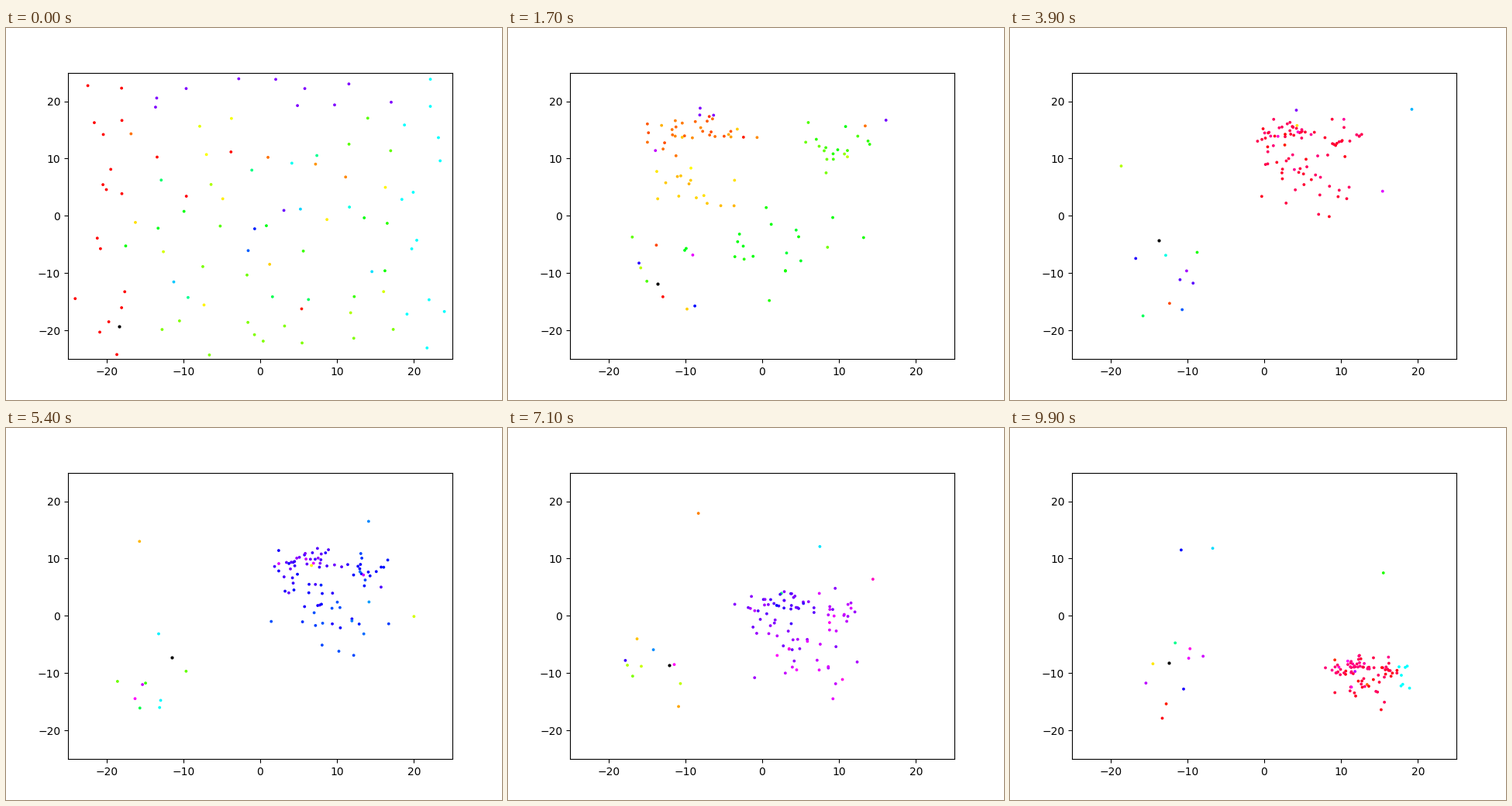
Recreate the animation shown at these times as a matplotlib script. Size 640 px wide and 480 px high, loop 10000 ms.

```python
import numpy as np
import matplotlib.pyplot as plt
from matplotlib.animation import FuncAnimation
from matplotlib.colors import hsv_to_rgb

FRAMES, SPEED, WALL = 100, 0.5, 17.5
rng = np.random.default_rng(8)
times = np.array([0, 17, 39, 54, 71, 82, 99])

# Flock at each time: core x, y, stretch x, y, heading, veer away from the core.
FLOCK = [(-8.5, 14.7, 2.5, 1.9, 25, 10),
         (3, 14.7, 1, 1, 345, 0),
         (6.4, 9.4, 1, 1, 257, -2.7),
         (2.4, 2, 1, 1, 265, 2.8),
         (5.6, -2.6, 0.9, 0.9, 290, 1),
         (12, -8.7, 0.6, 0.4, 331, 2)]

# Parts of the flock: size, offset from the core, spread.
PARTS = [(36, 0, 0, 1.9, 1.1), (18, 7, -1.2, 1.4, 1.6),
         (15, -0.2, -5, 2.6, 1.7), (19, 4.5, -11, 2.9, 2.6)]

STRAYS = [[(13.4, 15.7), (19.2, 18.6), (14.1, 16.5), (7.5, 12.1), (1.6, 13), (-6.7, 11.8)],
          [(-16.9, -3.7), (-18.6, 8.7), (-15.7, 13), (-8.3, 17.9), (-6.3, 18.8), (-10.8, 11.5)],
          [(16.1, 16.7), (15.4, 4.3), (20, -0.1), (14.4, 6.4), (17.4, 3), (15.5, 7.5)]]

HUNTER = np.array([(-18.3, -19.3), (-13.6, -11.9), (-13.7, -4.3), (-11.5, -7.2),
                   (-12.1, -8.6), (-11.5, -8.5), (-12.4, -8.2)])

size, off_x, off_y, sd_x, sd_y = np.repeat(PARTS, [p[0] for p in PARTS], axis=0).T
offset, spread = np.column_stack([off_x, off_y]), np.column_stack([sd_x, sd_y])
place = rng.normal(size=offset.shape)


def steer(pos, heading):
    """Velocity along the heading, or straight inward beyond a wall."""
    x, y = pos.T
    heading = np.select([x < -WALL, x > WALL, y < -WALL, y > WALL],
                        [0, 180, 90, 270], heading)
    a = np.radians(heading)
    return SPEED * np.column_stack([np.cos(a), np.sin(a)])


def start_pose(side=10):
    """Agents spread evenly over the whole field."""
    cells = np.stack(np.meshgrid(range(side), range(side)), -1).reshape(-1, 2)
    pos = (cells + rng.uniform(size=cells.shape)) * 49 / side - 24.5
    return pos, steer(pos, rng.normal(110, 70, len(pos)))


def flock_pose(x, y, stretch_x, stretch_y, heading, veer):
    stretch = np.array([stretch_x, stretch_y])
    scatter = 0.9 * place + 0.4 * rng.normal(size=place.shape)
    pos = (x, y) + offset * stretch + spread * np.sqrt(stretch) * scatter
    pos = np.clip(pos, -19, 19)
    turn = veer * (off_x - off_y / 2) + 7 * rng.standard_t(2.5, len(pos))
    return pos, steer(pos, heading + turn)


def circlers(t, n=9):
    """Agents that keep circling in the lower left."""
    i = np.arange(n)
    r = np.linspace(3, 8, n)
    way = np.where(i % 2, 1, -1)
    a = 2.4 * i + way * SPEED * t / r
    pos = np.column_stack([-13 + 0.7 * r * np.cos(a), -10.5 + r * np.sin(a)])
    vel = SPEED * way[:, None] * np.column_stack([-0.7 * np.sin(a), np.cos(a)])
    return pos, vel


def join(*poses):
    return tuple(np.vstack(part) for part in zip(*poses))


def match(a, b, span):
    """Reorder pose a so that each agent has a short way to its place in b."""
    ahead, back = a[0] + a[1] * span / 2, b[0] - b[1] * span / 2
    cost = ((back[:, None] - ahead[None]) ** 2).sum(2)
    order = np.arange(len(ahead))
    better = True
    while better:
        better = False
        for i in range(len(order)):
            for j in range(i):
                p, q = order[i], order[j]
                if cost[i, q] + cost[j, p] < cost[i, p] + cost[j, q] - 1e-9:
                    order[i], order[j] = q, p
                    better = True
    return a[0][order], a[1][order]


def hermite(a, b, span, s):
    """Position and velocity on the cubic between two poses."""
    (p, v), (q, w) = a, b
    pos = ((2*s**3 - 3*s**2 + 1) * p + (s**3 - 2*s**2 + s) * span * v
           + (3*s**2 - 2*s**3) * q + (s**3 - s**2) * span * w)
    vel = (6 * (s**2 - s) * (p - q) / span
           + (3*s**2 - 4*s + 1) * v + (3*s**2 - 2*s) * w)
    return pos, vel


strays = np.array(STRAYS).swapaxes(0, 1)
stray_vel = np.gradient(strays, times[1:], axis=0)
poses = [join(flock_pose(*f), circlers(t), (p, v))
         for f, t, p, v in zip(FLOCK, times[1:], strays, stray_vel)]
poses.insert(0, match(start_pose(), poses[0], times[1]))
hunter = list(zip(HUNTER, np.gradient(HUNTER, times, axis=0)))

fig, ax = plt.subplots(figsize=(6.4, 4.8), dpi=100)
ax.set(xlim=(-25, 25), ylim=(-25, 25))
dots = ax.scatter(*poses[0][0].T, s=3)
black = ax.scatter(*HUNTER[:1].T, s=4, c="black", zorder=3)


def update(frame):
    k = min(np.searchsorted(times, frame, side="right") - 1, len(times) - 2)
    span = times[k + 1] - times[k]
    s = (frame - times[k]) / span
    pos, vel = hermite(poses[k], poses[k + 1], span, s)
    hue = np.arctan2(vel[:, 1], vel[:, 0]) / (2 * np.pi) % 1
    ones = np.ones_like(hue)
    dots.set_offsets(pos)
    dots.set_color(hsv_to_rgb(np.column_stack([hue, ones, ones])))
    black.set_offsets([hermite(hunter[k], hunter[k + 1], span, s)[0]])
    return dots, black


anim = FuncAnimation(fig, update, frames=FRAMES, interval=100, repeat=True,
                     repeat_delay=0)
plt.show()
```
